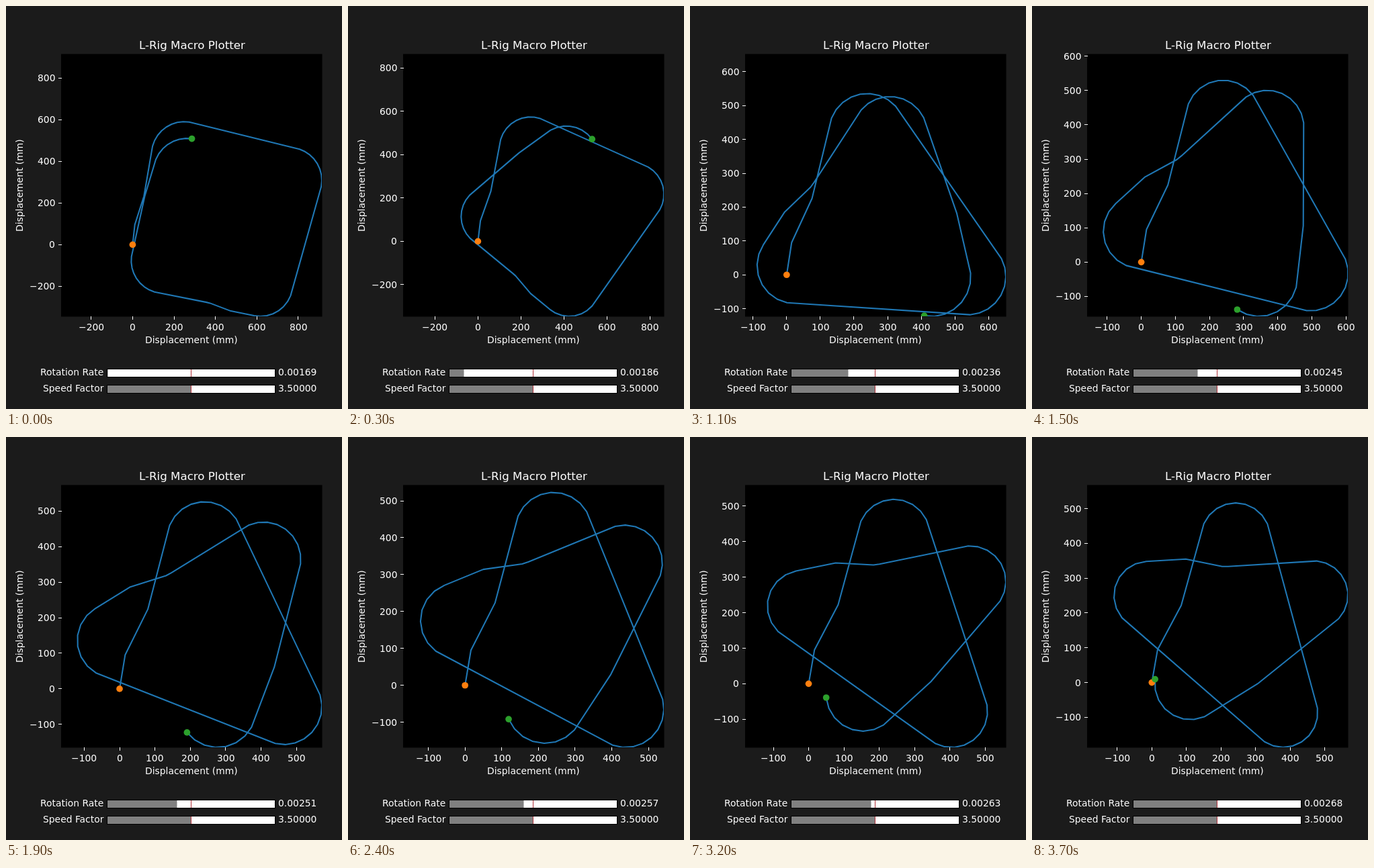
An HTML page with a canvas for the animation above (4.3 s loop, 500 px wide and 600 px high).

```html
<!DOCTYPE html>
<html lang="en">
<head>
<meta charset="utf-8">
<title>Macro Plotter</title>
<style>
html, body { margin: 0; width: 100%; height: 100%; overflow: hidden; background: #1b1b1b; }
canvas { display: block; }
</style>
</head>
<body>
<canvas id="stage" width="500" height="600"></canvas>
<script>
const ctx = document.getElementById('stage').getContext('2d');
const LOOP = 4300, STEP = 100, LAST = 37;
const BOX = { l: 82.5, r: 470, t: 72, b: 462 };
const RATE = { min: 0.00168, init: 0.00268, perPx: 0.000008 };
const FONT = '"DejaVu Sans", sans-serif';

// Recorded drive: [turn in degrees at the initial rate, distance, repeats]
const MACRO = [
  [10, 96.4, 1], [18.3, 143.9, 1], [-12.7, 244, 1],
  [16.57, 28.9, 8], [16.57, 549.4, 1],
  [16.236, 28.2, 8], [16.236, 545, 1],
  [18.16, 31.1, 7], [8.53, 114.5, 1], [14.9, 107.3, 1], [-11.4, 17.5, 1], [-3.5, 256, 1],
  [16.1, 27.6, 8], [16.1, 300.1, 1], [7, 180.8, 1],
  [17.2, 30.8, 7]
];

// Slider handle: [step, pixels from the left end]
const DRAG = [[0, 1], [7, 51], [11, 85], [13, 92], [19, 104], [24, 111], [28, 115], [37, 125]];

function handleAt(step) {
  const i = Math.max(1, DRAG.findIndex(k => k[0] >= step));
  const [s0, p0] = DRAG[i - 1], [s1, p1] = DRAG[i];
  return Math.round(p0 + (p1 - p0) * (step - s0) / (s1 - s0));
}

function drive(rate) {
  const k = rate / RATE.init * Math.PI / 180;
  const pts = [[0, 0]];
  let x = 0, y = 0, heading = 0;
  for (const [turn, dist, n] of MACRO) {
    for (let i = 0; i < n; i++) {
      heading += turn * k;
      x += dist * Math.sin(heading);
      y += dist * Math.cos(heading);
      pts.push([x, y]);
    }
  }
  return pts;
}

function rect(color, x, y, w, h) {
  ctx.fillStyle = color;
  ctx.fillRect(x, y, w, h);
}

// align: 0 left, 0.5 centre, 1 right
function label(str, x, y, align, size = 13.89) {
  ctx.font = size + 'px ' + FONT;
  ctx.fillStyle = '#fff';
  ctx.fillText(str, Math.round(x - ctx.measureText(str).width * align), Math.round(y));
}

function dot(color, x, y) {
  ctx.fillStyle = color;
  ctx.beginPath();
  ctx.arc(x, y, 4.86, 0, 2 * Math.PI);
  ctx.fill();
}

function slider(name, y, fill, value) {
  rect('#fff', 150, y, 250, 12);
  rect('#808080', 150, y, fill, 12);
  rect('#b03038', 275, y, 1, 12);
  ctx.strokeStyle = '#000';
  ctx.lineWidth = 1;
  ctx.strokeRect(150.5, y + 0.5, 250, 12);
  label(name, 145, y + 10, 1);
  label(value.toFixed(5), 405, y + 10, 0);
}

function plot(rate) {
  const pts = drive(rate), all = pts.flat();
  const lo = Math.min(...all), hi = Math.max(...all), span = hi - lo;
  const px = v => BOX.l + (v - lo) / span * (BOX.r - BOX.l);
  const py = v => BOX.b - (v - lo) / span * (BOX.b - BOX.t);

  rect('#000', 82, 71.5, 388.5, 391);
  ctx.save();
  ctx.beginPath();
  ctx.rect(BOX.l, BOX.t, BOX.r - BOX.l, BOX.b - BOX.t);
  ctx.clip();
  ctx.strokeStyle = '#1f77b4';
  ctx.lineWidth = 2.08;
  ctx.lineJoin = 'round';
  ctx.lineCap = 'square';
  ctx.beginPath();
  for (const [x, y] of pts) ctx.lineTo(px(x), py(y));
  ctx.stroke();
  const [ex, ey] = pts[pts.length - 1];
  dot('#ff7f0e', px(0), py(0));
  dot('#2ca02c', px(ex), py(ey));
  ctx.restore();

  const gap = span > 900 ? 200 : 100;
  for (let v = Math.ceil(lo / gap) * gap; v <= hi; v += gap) {
    const str = (v < 0 ? '\u2212' : '') + Math.abs(v);
    const x = px(v), y = py(v);
    rect('#fff', Math.floor(x), 462, 1, 5);
    rect('#fff', 78, Math.floor(y), 5, 1);
    label(str, x, 483, 0.5);
    label(str, 73, y + 5, 1);
  }
}

function draw(step) {
  const handle = handleAt(step);
  const rate = RATE.min + handle * RATE.perPx;
  rect('#1b1b1b', 0, 0, 500, 600);
  plot(rate);
  label('L-Rig Macro Plotter', 276.5, 64, 0.5, 16.67);
  label('Displacement (mm)', 276, 502, 0.5);
  ctx.save();
  ctx.translate(25, 267);
  ctx.rotate(-Math.PI / 2);
  label('Displacement (mm)', 0, 0, 0.5);
  ctx.restore();
  slider('Rotation Rate', 540, handle + 0.5, rate);
  slider('Speed Factor', 564, 125, 3.5);
}

function tick() {
  draw(Math.min(LAST, Math.floor(performance.now() % LOOP / STEP)));
  requestAnimationFrame(tick);
}
tick();
</script>
</body>
</html>
```
